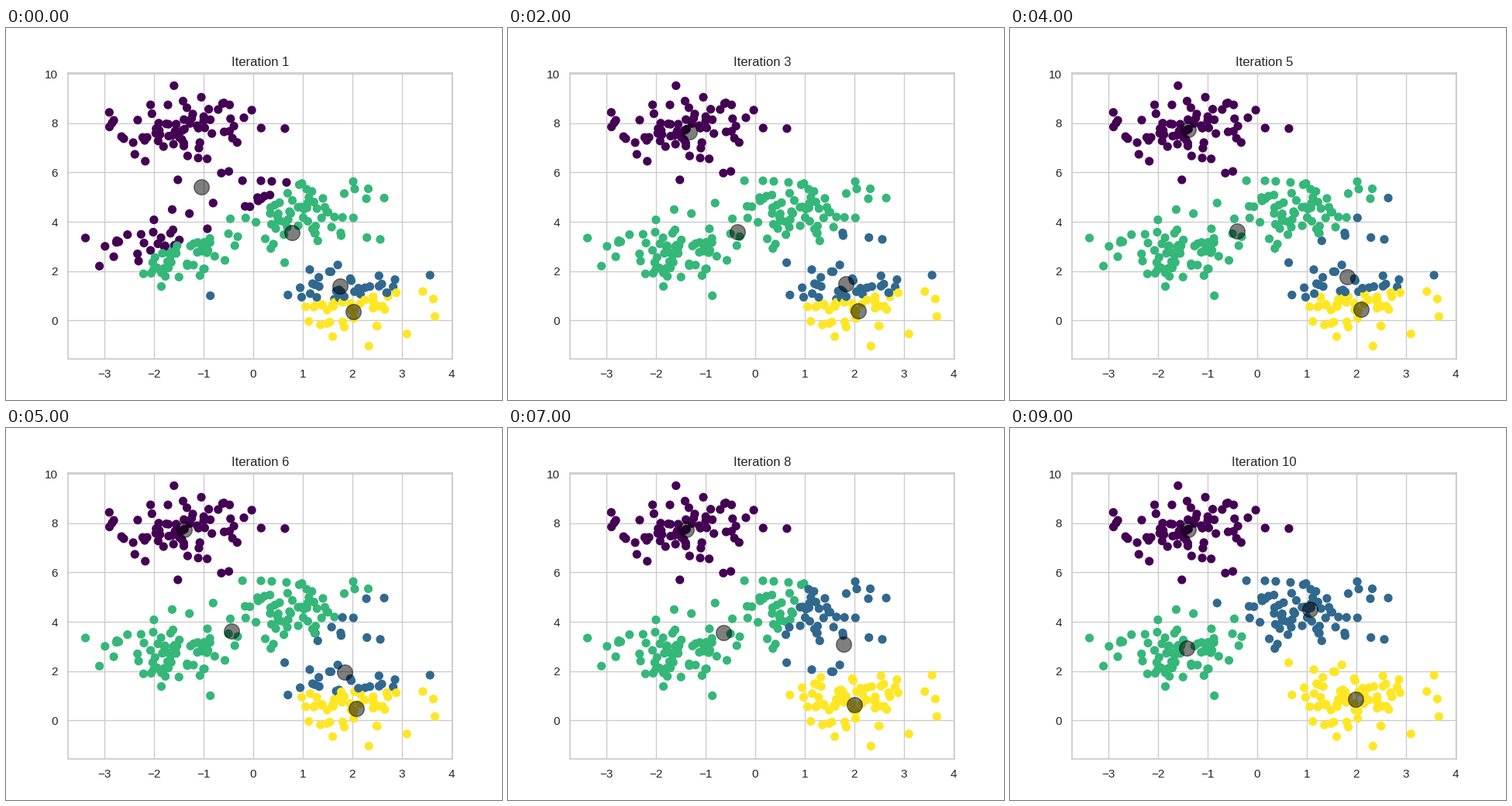
These frames come from a looping animation (640 by 480 pixels, 10 s). A matplotlib script:

```python
import numpy as np
import matplotlib.pyplot as plt
from matplotlib.animation import FuncAnimation

STEPS = 10
START = np.array([[-1.045, 5.405], [1.752, 1.378], [0.780, 3.552], [2.018, 0.350]])

plt.rcParams.update({
    "font.family": "Liberation Sans",
    "text.color": ".15",
    "axes.labelcolor": ".15",
    "axes.edgecolor": ".8",
    "axes.linewidth": 1.25,
    "axes.axisbelow": True,
    "axes.grid": True,
    "axes.titlesize": 12,
    "grid.color": ".8",
    "grid.linewidth": 1,
    "xtick.color": ".15",
    "ytick.color": ".15",
    "xtick.labelsize": 11,
    "ytick.labelsize": 11,
    "xtick.bottom": False,
    "ytick.left": False,
    "xtick.major.size": 6,
    "ytick.major.size": 6,
})


def make_blobs(n=300, k=4, std=0.7):
    """Gaussian clouds around k random middles, in shuffled order."""
    rng = np.random.RandomState(0)
    mids = rng.uniform(-10, 10, (k, 2))
    pts = np.concatenate([rng.normal(m, std, (n // k, 2)) for m in mids])
    order = np.arange(n)
    rng.shuffle(order)
    return pts[order]


def nearest(pts, centers):
    gaps = pts[:, None] - centers[None]
    return (gaps ** 2).sum(axis=2).argmin(axis=1)


def run_kmeans(pts, centers, steps):
    """Return (centers, labels) for every iteration."""
    history = []
    for _ in range(steps):
        labels = nearest(pts, centers)
        history.append((centers, labels))
        centers = np.array([pts[labels == j].mean(axis=0)
                            for j in range(len(centers))])
    return history


points = make_blobs()
history = run_kmeans(points, START, STEPS)

fig, ax = plt.subplots(figsize=(6.4, 4.8), dpi=100)
dots = ax.scatter(*points.T, c=history[0][1], s=50, cmap="viridis")
marks = ax.scatter(*START.T, c="black", s=200, alpha=0.5)
title = ax.set_title("Iteration 1")


def draw(i):
    centers, labels = history[i]
    dots.set_array(labels)
    marks.set_offsets(centers)
    title.set_text(f"Iteration {i + 1}")
    return dots, marks, title


anim = FuncAnimation(fig, draw, frames=STEPS, interval=1000,
                     repeat=True, repeat_delay=0)
plt.show()
```
